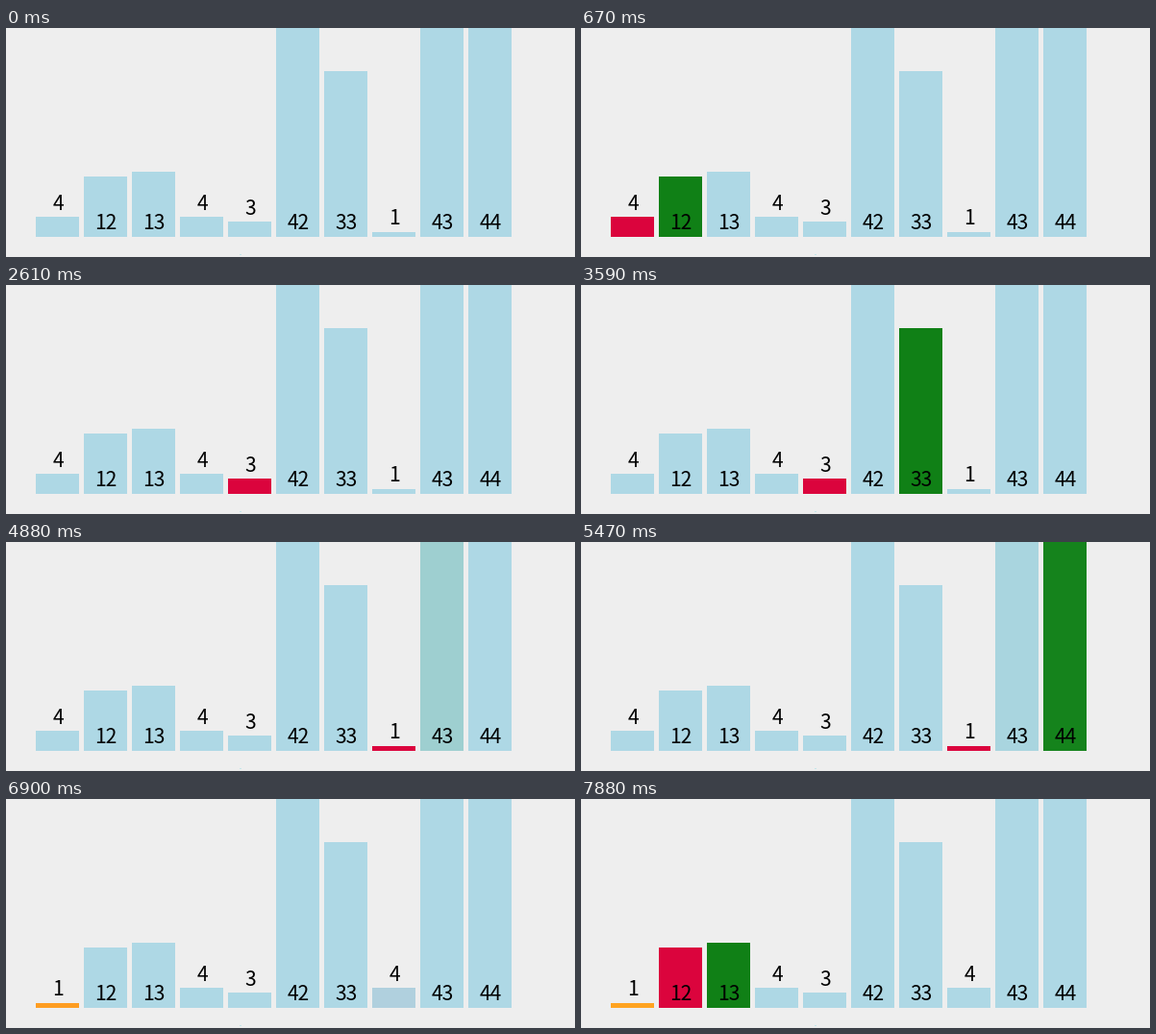
Animation of 592 by 239 pixels, one loop 8 s. Source, as a matplotlib script:

```python
import matplotlib.pyplot as plt
import numpy as np
from matplotlib.animation import FuncAnimation
from matplotlib.patches import Rectangle

W, H, DPI = 592, 239, 80
LOOP, STEP = 8000, 20
FLOOR, UNIT = 218, 5.24
LEFT, PITCH, BAR_W = 31, 50, 45
VALUES = [4, 12, 13, 4, 3, 42, 33, 1, 43, 44]


def rgb(*channels):
    return np.array(channels) / 255


BLUE = rgb(174, 216, 229)
GREEN = rgb(16, 128, 22)
RED = rgb(219, 4, 61)
ORANGE = rgb(255, 163, 32)

# Eased progress at each visible step of a transition
TWO = (0.67, 1)
THREE = (0.1, 0.65, 1)
FOUR = (0.03, 0.5, 0.97, 1)

# start, end, progress levels, new colour per bar
EVENTS = [
    (60, 220, THREE, {0: RED}),
    (590, 670, TWO, {1: GREEN}),
    (1040, 1200, THREE, {1: BLUE, 2: GREEN}),
    (1570, 1650, TWO, {2: BLUE, 3: GREEN}),
    (2020, 2160, THREE, {3: BLUE, 4: GREEN}),
    (2470, 2610, THREE, {0: BLUE, 4: RED}),
    (2920, 3060, THREE, {5: GREEN}),
    (3450, 3590, THREE, {5: BLUE, 6: GREEN}),
    (3900, 4040, THREE, {6: BLUE, 7: GREEN}),
    (4350, 4510, THREE, {4: BLUE, 7: RED}),
    (4880, 5020, THREE, {8: GREEN}),
    (5330, 5550, FOUR, {8: BLUE, 9: GREEN}),
    (5780, 6000, FOUR, {9: BLUE, 0: RED}),
    (6760, 6900, (0.1, 0.65, 0.96), {0: BLUE, 7: ORANGE}),
    (7290, 7430, THREE, {0: BLUE, 7: ORANGE, 1: RED}),
    (7800, 7880, TWO, {2: GREEN}),
]
SWAP = (6310, 6530, FOUR)
SWAPPED = {0: 7, 7: 0}


def progress(t, start, end, levels):
    if t < start:
        return 0
    last = len(levels) - 1
    step = int((t - start + 8) * last / (end - start))
    return levels[min(step, last)]


fig = plt.figure(figsize=(W / DPI, H / DPI), dpi=DPI, facecolor="#eeeeee")
ax = fig.add_axes([0, 0, 1, 1])
ax.set(xlim=(0, W), ylim=(H, 0))
ax.axis("off")
ax.add_patch(Rectangle((243, 236), 2, 1, color="#c4e6ea", lw=0))

bars, labels = [], []
for i, value in enumerate(VALUES):
    height = value * UNIT
    bar = Rectangle((LEFT + PITCH * i, FLOOR - height), BAR_W, height,
                    lw=0, zorder=2 * i + 2)
    bars.append(ax.add_patch(bar))
    baseline = 210 if value >= 10 else FLOOR - height - 7.5
    labels.append(ax.text(0, baseline, str(value), ha="center", va="baseline",
                          family="Noto Sans CJK JP", fontsize=21 * 72 / DPI,
                          color="black", zorder=2 * i + 3))


def draw(frame):
    t = frame * STEP + STEP / 2
    colours = [BLUE] * len(VALUES)
    for start, end, levels, changes in EVENTS:
        p = progress(t, start, end, levels)
        for i, colour in changes.items():
            colours[i] = colours[i] + (colour - colours[i]) * p

    moved = progress(t, *SWAP)
    for i, (bar, label) in enumerate(zip(bars, labels)):
        slot = i + (SWAPPED.get(i, i) - i) * moved
        x = LEFT + PITCH * slot
        bar.set_x(x)
        bar.set_facecolor(colours[i])
        label.set_x(x + BAR_W / 2 + 0.5)
    return bars + labels


anim = FuncAnimation(fig, draw, frames=LOOP // STEP, interval=STEP,
                     repeat=True, repeat_delay=0, blit=False)
plt.show()
```
